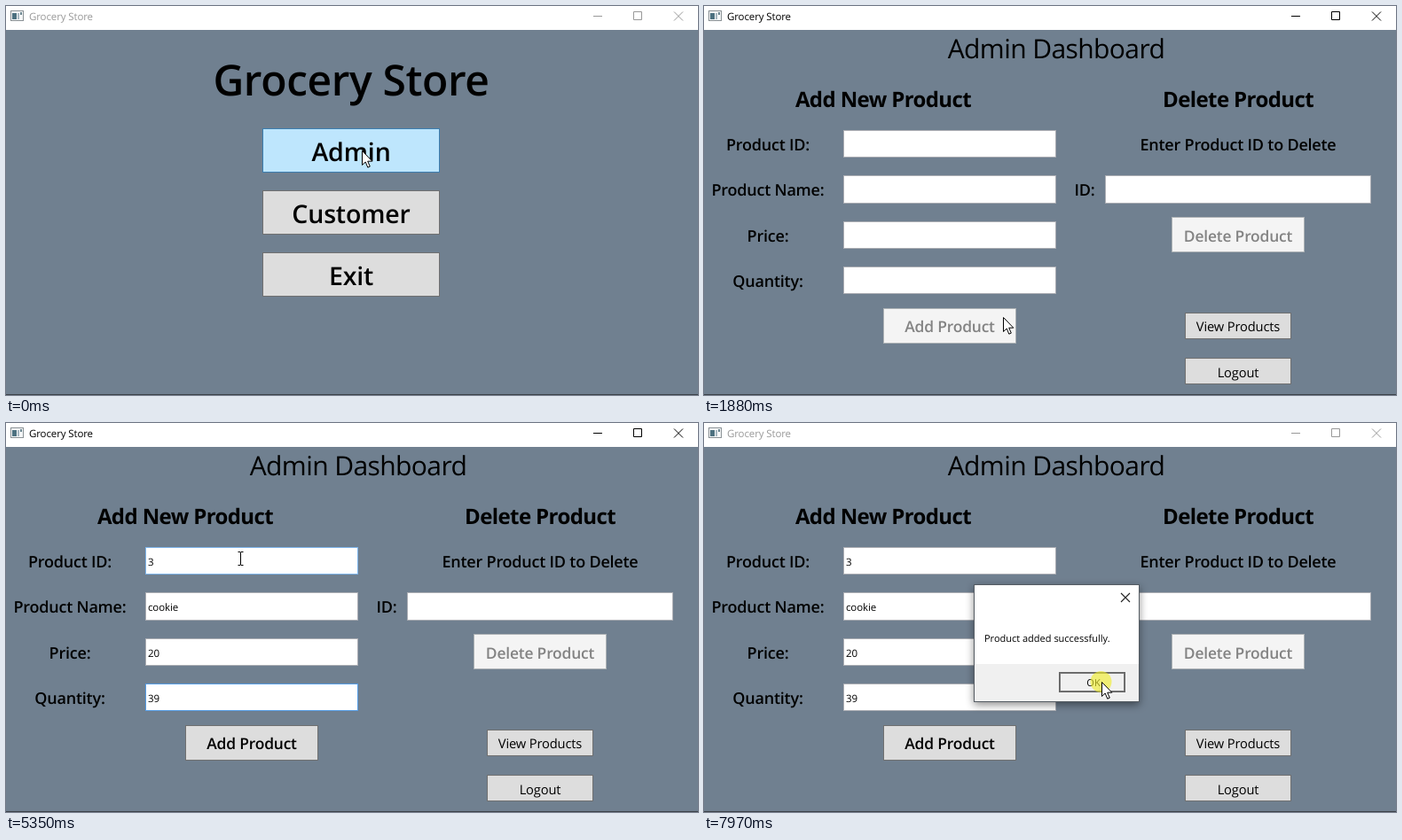
Write an HTML page that moves like this. It is 780 px wide and 439 px high and loops after 8 s.

```html
<!DOCTYPE html>
<html lang="en">
<head>
<meta charset="utf-8">
<title>Grocery Store</title>
<style>
html, body { margin: 0; width: 100%; height: 100%; overflow: hidden; background: #708090; }
svg { display: block; width: 780px; height: 439px; font-family: "Open Sans", "Noto Sans", sans-serif; text-rendering: geometricPrecision; }
text { white-space: pre; }
.mid { text-anchor: middle; }
.small { font-size: 11.5px; letter-spacing: -.01em; }
.hero { font-size: 48px; font-weight: 600; letter-spacing: -.008em; }
.title { font-size: 30px; font-weight: 500; letter-spacing: -.02em; }
.head { font-size: 24px; font-weight: 700; letter-spacing: -.025em; }
.label { font-size: 18px; font-weight: 600; letter-spacing: -.012em; }
.big { font-size: 28.5px; font-weight: 600; letter-spacing: -.005em; }
.mdl { font-size: 17.4px; font-weight: 600; letter-spacing: -.01em; }
.sml { font-size: 14.7px; font-weight: 500; letter-spacing: -.01em; }
.ret { font-size: 17.5px; letter-spacing: -.015em; }
.msg { font-size: 11px; font-weight: 500; }

.btn rect { fill: #ddd; stroke: #707070; }
.btn.hover rect { fill: #bee6fd; stroke: #3c7fb1; }
.btn.down rect { fill: #c4e5f6; stroke: #2c628b; }
.btn.off rect { fill: #f4f4f4; stroke: #adb2b5; }
.btn.off text { fill: #838383; }
.field rect { fill: #fff; stroke: #abadb3; }
.field.hover rect { stroke: #7eb4ea; }
.field.focus rect { stroke: #569de5; }
#chrome { color: #000; }
#chrome.idle { color: #999; }
#chrome path { fill: none; stroke: currentColor; }
#chrome text { fill: currentColor; }
#ok .edge { fill: #f0f0f0; stroke: #646464; }
#ok .bevel { fill: none; stroke: #fff; }
#ok.down .bevel { stroke: #777; }
</style>
</head>
<body>
<svg viewBox="0 0 780 439">
  <defs>
    <linearGradient id="header" x2="0" y2="1">
      <stop offset=".3" stop-color="#fff"/><stop offset="1" stop-color="#f0f1f3"/>
    </linearGradient>
    <filter id="shadow" x="-20%" y="-20%" width="140%" height="150%">
      <feDropShadow dx="0" dy="3" stdDeviation="5" flood-opacity=".45"/>
    </filter>
  </defs>
  <rect width="780" height="439" fill="#708090"/>
  <g id="main"></g>
  <g id="dash"></g>
  <g id="table"></g>
  <rect y="438" width="780" height="1" fill="#3c4249"/>
  <g id="chrome">
    <rect width="780" height="27" fill="#fff"/>
    <rect x="5.5" y="5.5" width="14" height="11" fill="#f4f6f7" stroke="#8a9195"/>
    <rect x="7" y="8" width="5" height="7" fill="#4d7180"/>
    <rect x="13" y="8" width="2" height="7" fill="#a9b9c2"/>
    <rect x="16" y="7" width="2" height="3" fill="#6d8791"/>
    <text class="small" x="26" y="16">Grocery Store</text>
    <path d="M662 11.5h10M707.5 6.5h9v9h-9zM753 6.5l10 10m0-10l-10 10"/>
  </g>
  <g id="dialog">
    <rect x="304.5" y="182.5" width="186" height="132" fill="#fff" stroke="#555c63" filter="url(#shadow)"/>
    <rect x="305" y="272" width="185" height="42" fill="#f0f0f0"/>
    <path d="M470 192l10 10m0-10l-10 10" stroke="#222" stroke-width="1.1"/>
    <text class="msg" x="316" y="247">Product added successfully.</text>
    <g id="ok">
      <rect class="edge" x="400.5" y="281.5" width="74" height="22"/>
      <rect class="bevel" x="401.5" y="282.5" width="72" height="20"/>
      <text class="msg mid" x="439" y="297">OK</text>
    </g>
  </g>
  <rect id="caret" width="1" height="15"/>
  <circle id="click" r="12" fill="#f0ee28" fill-opacity=".62"/>
  <path id="arrow" d="M.5 .5V16.5L4.2 13 6.8 19.2 9.3 18.1 6.7 12.2H11.8Z" fill="#fff" stroke="#000"/>
  <path id="beam" d="M-3 -7.5h2.5l.5 .5 .5 -.5H3M0 -7V7M-3 7.5h2.5l.5 -.5 .5 .5H3" fill="none" stroke="#000"/>
</svg>
<script>
const LOOP = 8000;
const $ = id => document.getElementById(id);
const controls = [];

const label = (cls, x, y, s) => `<text class="${cls}" x="${x}" y="${y}">${s}</text>`;
const box = (x, y, w, h) => `<rect x="${x + .5}" y="${y + .5}" width="${w - 1}" height="${h - 1}"/>`;

function control(kind, screen, id, x, y, w, h, inner) {
  controls.push({ kind, screen, id, x, y, w, h });
  return `<g id="${id}" class="${kind}">${box(x, y, w, h)}${inner}</g>`;
}
const button = (screen, id, x, y, w, h, size, base, s) =>
  control('btn', screen, id, x, y, w, h, label(size + ' mid', x + w / 2, base, s));
const field = (id, x, y, w, h) =>
  control('field', 'dash', id, x, y, w, h, label('small', x + 3, y + 20.5, ''));

$('main').innerHTML = label('hero mid', 389, 101, 'Grocery Store') +
  ['Admin', 'Customer', 'Exit'].map((s, i) =>
    button('main', s, 289, 138 + 70 * i, 200, 50, 'big', 175 + 70 * i, s)).join('');

$('dash').innerHTML =
  label('title mid', 397, 59, 'Admin Dashboard') +
  label('head mid', 202, 114, 'Add New Product') +
  label('head mid', 602, 114, 'Delete Product') +
  ['Product ID:', 'Product Name:', 'Price:', 'Quantity:'].map((s, i) =>
    label('label mid', 72, Math.round(163 + 51.4 * i), s)).join('') +
  label('label mid', 602, 163, 'Enter Product ID to Delete') +
  label('label mid', 429, 214, 'ID:') +
  field('pid', 157, 140, 240, 31) + field('name', 157, 191, 240, 32) +
  field('price', 157, 243, 240, 31) + field('qty', 157, 294, 240, 31) +
  field('del', 452, 191, 300, 32) +
  button('dash', 'add', 202, 341, 150, 40, 'mdl', 368, 'Add Product') +
  button('dash', 'remove', 527, 238, 150, 40, 'mdl', 266, 'Delete Product') +
  button('dash', 'view', 542, 346, 120, 30, 'sml', 367, 'View Products') +
  button('dash', 'logout', 542, 397, 120, 30, 'sml', 418.5, 'Logout');

const columns = [157, 317, 477, 637];
const row = (cells, y) => cells.map((s, i) => label('small', 1 + 160 * i, y, s)).join('');
$('table').innerHTML = `
  <rect y="27" width="780" height="373" fill="#f0f0f0"/>
  <rect y="27" width="780" height="1" fill="#8c9298"/>
  <rect y="28" width="780" height="24" fill="url(#header)"/>
  <rect y="51" width="780" height="1" fill="#a5a7aa"/>
  <rect y="52" width="780" height="38" fill="#fff"/>
  <path d="M0 70.5H780M0 89.5H780${columns.map(x => `M${x + .5} 52V90`).join('')}" stroke="#000"/>
  <path d="${columns.map(x => `M${x + .5} 30V51`).join('')}" stroke="#d9dbde"/>` +
  ['Id', 'Name', 'Price', 'Quantity'].map((s, i) => label('small', 3 + 160 * i, 45, s)).join('') +
  row(['1', 'Nimko', '1', '46'], 66) + row(['2', 'Dofs', '20', '97'], 85) +
  button('table', 'back', 322, 400, 150, 38, 'ret', 426, 'Return to Main');

// Pointer moves: start, number of 75 ms steps, end point
const moves = [
  [300, 7, 602, 352], [920, 1, 602, 357], [1170, 5, 363, 420], [1800, 6, 264, 153],
  [5650, 4, 274, 358], [6030, 1, 275, 357], [6480, 7, 469, 287], [7110, 4, 449, 292], [7570, 1, 448, 292]
];
const clicks = [[160, 230], [1500, 1650], [2260, 2410], [6180, 6330], [7970, LOOP]];
const presses = [...clicks, [850, 920]];
// Key strokes: time, field, its text so far
const keys = [
  [2260, 'pid', ''], [2590, 'pid', '3'],
  [2690, 'name', 'c'], [2850, 'name', 'co'], [3080, 'name', 'coo'],
  [3230, 'name', 'cook'], [3400, 'name', 'cooki'], [3550, 'name', 'cookie'],
  [3620, 'price', ''], [3870, 'price', '2'], [4020, 'price', '20'],
  [4330, 'qty', ''], [4480, 'qty', '3'], [4800, 'qty', '39']
];

const during = (list, t) => list.some(([a, b]) => t >= a && t < b);
const show = (id, on) => { $(id).style.display = on ? '' : 'none'; };
const place = (id, x, y) => $(id).setAttribute('transform', `translate(${x} ${y})`);

function pointer(t) {
  let x = 400.5, y = 163;
  for (const [start, steps, tx, ty] of moves) {
    if (t < start) break;
    const k = Math.min(1, (Math.floor((t - start) / 75) + 1) / steps);
    const e = k * k * (3 - 2 * k);
    x += (tx - x) * e;
    y += (ty - y) * e;
  }
  return [Math.round(x), Math.round(y)];
}

function typing(t) {
  const text = {};
  let last = 0, focus = '';
  for (const [time, id, s] of keys) {
    if (t < time) break;
    text[id] = s;
    focus = id;
    last = time;
  }
  if (t >= 6180) focus = '';
  return { text, focus, last };
}

function draw(t) {
  const screen = t < 230 ? 'main' : t >= 920 && t < 1650 ? 'table' : 'dash';
  const dialog = t >= 6330;
  const [x, y] = pointer(t);
  const down = during(presses, t);
  const { text, focus, last } = typing(t);
  let beam = false;

  for (const s of ['main', 'dash', 'table']) show(s, s === screen);
  show('dialog', dialog);
  $('chrome').setAttribute('class', t < 230 || dialog ? 'idle' : '');
  $('ok').setAttribute('class', dialog && down ? 'down' : '');

  for (const c of controls) {
    const over = c.screen === screen && !dialog &&
      x >= c.x && x < c.x + c.w && y >= c.y && y < c.y + c.h;
    const off = c.id === 'remove' || c.id === 'add' && t < 4800;
    const isField = c.kind === 'field';
    if (isField) {
      beam = beam || over;
      $(c.id).lastChild.textContent = text[c.id] || '';
    }
    const state = off ? 'off' : isField && c.id === focus ? 'focus' :
      over ? (down && !isField ? 'down' : 'hover') : '';
    $(c.id).setAttribute('class', c.kind + ' ' + state);
  }

  const blink = Math.floor((t - last) / 550) % 2 === 0 || t >= 6030;
  show('caret', focus && blink);
  if (focus) {
    const c = controls.find(c => c.id === focus);
    const w = text[focus] ? $(focus).lastChild.getComputedTextLength() : 0;
    place('caret', Math.round(c.x + 3 + w), c.y + 8);
  }

  show('click', during(clicks, t));
  place('click', x - .5, y);
  show('arrow', !beam);
  show('beam', beam);
  place('arrow', x, y);
  place('beam', x + .5, y);
}

const start = performance.now();
function tick() {
  draw((performance.now() - start) % LOOP);
  requestAnimationFrame(tick);
}
tick();
</script>
</body>
</html>
```
